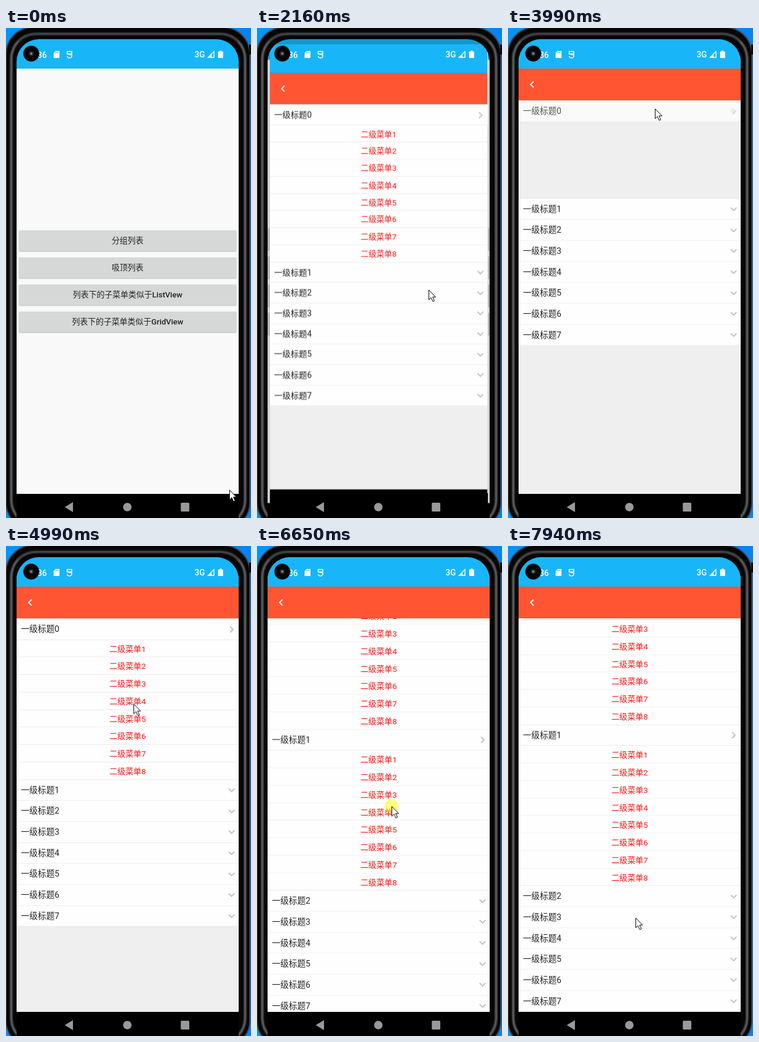
An HTML page for the animation above (8 s loop, 417 by 833 pixels).

```html
<!DOCTYPE html>
<html lang="zh-CN">
<head>
<meta charset="utf-8">
<title>Expandable list</title>
<style>
* { box-sizing: border-box; }
html, body { margin: 0; width: 100%; height: 100%; overflow: hidden; }
body {
  position: relative; background: linear-gradient(90deg, #0494fc, #0a82f0); color: #222;
  font-family: Roboto, "Noto Sans CJK SC", "Noto Sans CJK", sans-serif;
  --move: cubic-bezier(.37, 0, .63, 1);
}
.phone, .ring, .screen, .win, .layer, .cursor, .key { position: absolute; }
.phone { left: -1px; top: -2px; width: 417px; height: 855px; border: 2px solid #424242; border-radius: 46px; background: #060606; }
.ring { left: 7px; top: 8px; width: 402px; height: 839px; border: 4px solid #626262; border-top-color: #4a4a4a; border-radius: 44px; filter: blur(.8px); }
.key { left: 414px; top: 28px; width: 3px; height: 17px; background: #080808; }
.screen { left: 18px; top: 19px; width: 378px; height: 814px; border-radius: 38px 38px 0 0; overflow: hidden; background: #000; }
.win { left: 0; top: 0; width: 378px; height: 823px; background: #000; }
.bar { height: 50px; background: #18b6f8; }
.layer { left: 0; top: 0; }

/* start page */
.home { animation: exit 8s infinite; }
.page { position: relative; height: 723px; background: #f9f9f9; }
.btn {
  position: absolute; left: 4px; width: 370px; height: 35px; border-radius: 2px; overflow: hidden;
  background: #d6d7d7; box-shadow: 0 1px 2px rgba(0, 0, 0, .28);
  font-size: 13.5px; line-height: 35px; text-align: center; white-space: nowrap;
}
.btn b { font-weight: 500; }
.ripple { position: absolute; left: -30px; top: -290px; width: 600px; height: 600px; border-radius: 50%; background: #000; opacity: 0; animation: ripple 8s infinite; }

/* list page */
.detail { animation: enter 8s infinite; }
.title { height: 54px; background: #ff5533; }
.view { height: 669px; overflow: hidden; background: #efefef; }
.list { position: relative; top: .6px; transform-origin: 50% 100%; animation: scroll 8s infinite; }
.head, .sub { background: #fefefe; border-bottom: 1px solid #ececec; white-space: nowrap; }
.head { position: relative; height: 35.67px; padding-left: 7.5px; font-size: 14.3px; line-height: 35.6px; }
.sub { height: 29.76px; font-size: 13.65px; line-height: 30px; text-align: center; color: #f11; }
.head svg { position: absolute; left: 359px; top: 10.5px; fill: none; stroke: #c1c1c1; stroke-width: 2; }
.open { opacity: 0; }
.h0 { animation: dip0 8s infinite var(--move); }
.h0 .open { animation: open0 8s infinite var(--move); }
.h0 .shut { animation: shut0 8s infinite var(--move); }
.h1 { animation: dip1 8s infinite var(--move); }
.h1 .open { animation: open1 8s infinite var(--move); }
.h1 .shut { animation: shut1 8s infinite var(--move); }
.s0 { animation: subs0 8s infinite linear; }
.s1 { animation: subs1 8s infinite linear; }
.rest { position: relative; animation: rest 8s infinite var(--move); }
.tail { position: relative; animation: tail 8s infinite var(--move); }

.cursor { left: 0; top: 0; width: 0; height: 0; animation: cursor 8s infinite ease-in-out; }
.cursor svg { position: absolute; left: -14px; top: -14px; }
.press { opacity: 0; animation: press 8s infinite step-end; }

@keyframes exit {
  0%, 25.21% { transform: none; filter: brightness(1); animation-timing-function: cubic-bezier(.3, 0, .8, .15); }
  26.15% { transform: scale(1.02); filter: brightness(.92); animation-timing-function: cubic-bezier(.05, .7, .1, 1); }
  30.84%, 100% { transform: scale(1.05); filter: brightness(.81); }
}
@keyframes enter {
  0%, 25.21% { transform: scale(.85); opacity: 0; animation-timing-function: cubic-bezier(.3, 0, .8, .15); }
  26.15% { transform: scale(.91); opacity: 1; animation-timing-function: cubic-bezier(.05, .7, .1, 1); }
  30.84%, 100% { transform: none; opacity: 1; }
}
@keyframes ripple {
  0%, 19.5% { transform: scale(.03); opacity: 0; }
  19.6% { transform: scale(.05); opacity: .14; }
  21.3% { transform: none; opacity: .14; }
  23.7%, 100% { transform: none; opacity: 0; }
}
@keyframes subs0 {
  0%, 46.91% { opacity: 1; }
  48.41%, 58.5% { opacity: 0; }
  60%, 100% { opacity: 1; }
}
@keyframes subs1 {
  0%, 76.25% { opacity: 0; }
  77.75%, 100% { opacity: 1; }
}
@keyframes rest {
  0%, 48.42% { transform: none; }
  51.55%, 55.38% { transform: translateY(-238.08px); }
  58.5%, 100% { transform: none; }
}
@keyframes tail {
  0%, 73.13% { transform: translateY(-238.08px); }
  76.25%, 100% { transform: none; }
}
@keyframes dip0 {
  0%, 48.42%, 51.55%, 55.38%, 58.5%, 100% { opacity: 1; }
  49.98%, 56.94% { opacity: .76; }
}
@keyframes dip1 {
  0%, 73.13%, 76.25%, 100% { opacity: 1; }
  74.69% { opacity: .76; }
}
@keyframes open0 {
  0%, 48.42%, 58.5%, 100% { opacity: 1; }
  51.55%, 55.38% { opacity: 0; }
}
@keyframes shut0 {
  0%, 48.42%, 58.5%, 100% { opacity: 0; }
  51.55%, 55.38% { opacity: 1; }
}
@keyframes open1 { 0%, 73.13% { opacity: 0; } 76.25%, 100% { opacity: 1; } }
@keyframes shut1 { 0%, 73.13% { opacity: 1; } 76.25%, 100% { opacity: 0; } }
@keyframes scroll {
  0%, 80.63% { transform: translateY(0) scaleY(1); }
  84.5% { transform: translateY(-93.4px) scaleY(1); animation-timing-function: ease-out; }
  87%, 88.75% { transform: translateY(-93.4px) scaleY(1.0148); }
  93.75%, 100% { transform: translateY(-93.4px) scaleY(1); }
}
@keyframes cursor {
  0%, .8% { transform: translate(380px, 785px); }
  9.9%, 11.6% { transform: translate(212px, 450px); }
  15%, 28.1% { transform: translate(292px, 445px); }
  36.1% { transform: translate(223px, 194px); }
  40.6%, 45% { transform: translate(215px, 138px); }
  48.5%, 54.4% { transform: translate(250px, 137px); }
  62.3% { transform: translate(217px, 268px); }
  65%, 75% { transform: translate(217px, 405px); }
  78.9%, 80.6% { transform: translate(228px, 489px); }
  87%, 88.75% { transform: translate(231px, 346px); }
  94%, 95.8% { transform: translate(221px, 605px); }
  98%, 100% { transform: translate(217px, 632px); }
}
@keyframes press {
  0%, 20.5%, 44.88%, 54.25%, 71.75%, 88.75%, 100% { opacity: 0; }
  18.75%, 43.13%, 52.5%, 70%, 79.4% { opacity: 1; }
}
</style>
</head>
<body>
<div class="phone"></div>
<div class="ring"></div>
<div class="key"></div>

<div class="screen">
  <div class="win home">
    <div class="bar"></div>
    <div class="page">
      <div class="btn" style="top:275px">分组列表</div>
      <div class="btn" style="top:321px">吸顶列表</div>
      <div class="btn" style="top:367px">列表下的子菜单类似于<b>ListView</b><i class="ripple"></i></div>
      <div class="btn" style="top:413px">列表下的子菜单类似于<b>GridView</b></div>
    </div>
  </div>
  <div class="win detail">
    <div class="bar"></div>
    <div class="title">
      <svg width="60" height="54" fill="none" stroke="#fff" stroke-width="1.8"><path d="M25.5 22l-5 5 5 5"/></svg>
    </div>
    <div class="view"><div class="list"></div></div>
  </div>
</div>

<svg class="layer" width="417" height="833">
  <g fill="#fff" font-family="Roboto, sans-serif" font-size="14" font-weight="500">
    <text x="53.5" y="50.5">36</text>
    <text x="321" y="50">3G</text>
    <path d="M84.5 39h6.5v12h-10v-8.500z"/>
    <path d="M84.5 40.5v2.500m2.200-2.500v2.500m2.200-2.500v2.500" stroke="#18b6f8"/>
    <path d="M354 40v10h-10z" fill="none" stroke="#fff" stroke-width="1.4"/>
    <path d="M350 45v5h-5z"/>
    <path d="M361 40h2.500v-1.500h3.500v1.500h2.500v11h-8.500z"/>
    <path d="M104 40h8v4h-8zm0 4l8 2v2q-1 3-4 3t-4-3" fill="none" stroke="#fff" stroke-width="1.4"/>
  </g>
  <circle cx="43" cy="43.500" r="13.500" fill="#050505"/>
  <circle cx="43" cy="43.500" r="4.500" fill="#242424"/>
  <circle cx="43" cy="43.500" r="2" fill="#858585"/>
  <g fill="#999">
    <path d="M100 814.500l14-8.500v17z"/>
    <circle cx="206.500" cy="814.500" r="7.200"/>
    <rect x="297.500" y="807" width="14.500" height="15" rx="1.500"/>
  </g>
</svg>

<div class="cursor">
  <svg width="40" height="40" viewBox="-14 -14 40 40">
    <circle class="press" r="12" fill="#ff0" fill-opacity=".5"/>
    <path d="M.5.5v16.500l3.800-3.700 3 6.700 2.700-1.200-3-6.500h5z" fill="#fff" stroke="#000"/>
  </svg>
</div>

<script>
const span = (from, n, make) => Array.from({ length: n }, (_, i) => make(from + i)).join('');
const head = i => `<div class="head h${i}">一级标题${i}<svg width="14" height="14">
  <path class="shut" d="M2 4.500l5 5 5-5"/><path class="open" d="M4.500 2l5 5-5 5"/></svg></div>`;
const subs = i => `<div class="s${i}">${span(1, 8, n => `<div class="sub">二级菜单${n}</div>`)}</div>`;

document.querySelector('.list').innerHTML =
  head(0) + subs(0) +
  `<div class="rest">${head(1)}${subs(1)}<div class="tail">${span(2, 6, head)}</div></div>`;
</script>
</body>
</html>
```
